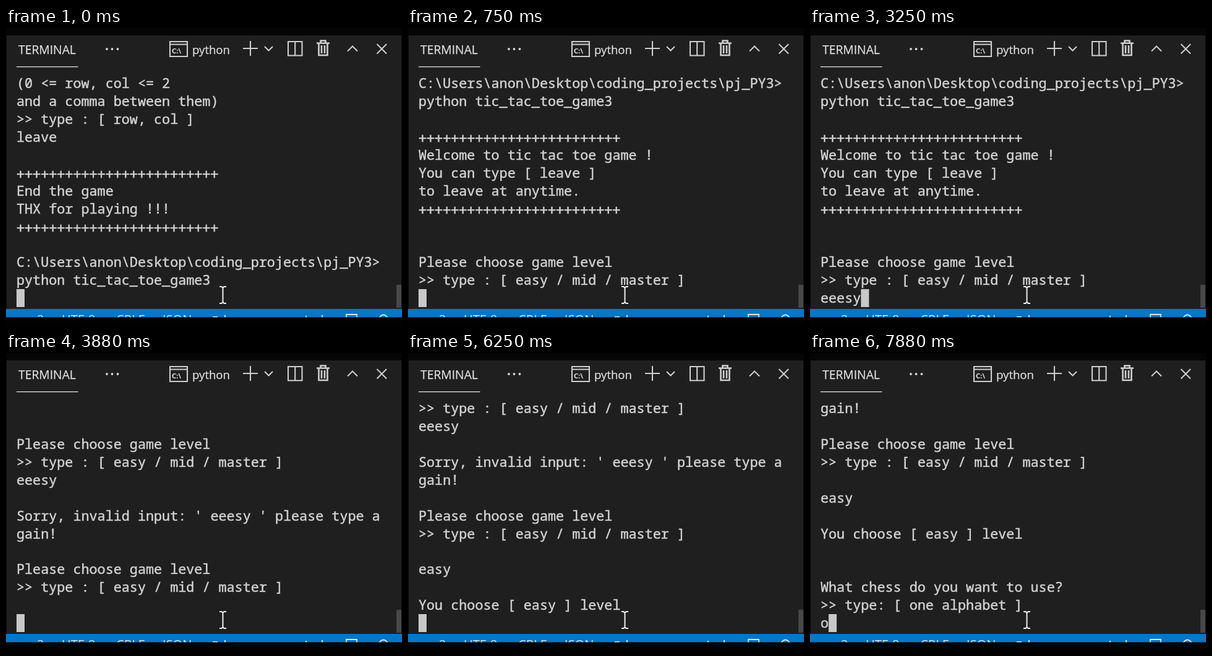
An HTML page for the animation above (8000 ms loop, 640 px wide and 480 px high).

```html
<!DOCTYPE html>
<html lang="en">
<head>
<meta charset="utf-8">
<title>Terminal session</title>
<style>
  html, body { margin: 0; width: 100%; height: 100%; overflow: hidden; background: #000; }
  svg { display: block; width: 100vw; height: 100vh; filter: blur(.55px); }
  .ui { font-family: "Open Sans", "Noto Sans", sans-serif; }
  .mono { font-family: "Noto Sans Mono", "DejaVu Sans Mono", monospace; font-size: 21.78px; fill: #d2d2d2; stroke: #d2d2d2; stroke-width: .5; }
  .mono text { white-space: pre; }
  .mono .rule { font-family: "DejaVu Sans Mono", monospace; font-size: 21.7px; transform: translateY(1.2px); }
  .icon { fill: none; stroke: #cecece; stroke-width: 2.1; }
</style>
</head>
<body>
<svg viewBox="0 0 640 480">
  <rect width="640" height="480" fill="#050505"/>
  <rect x="1" y="12" width="638" height="442" fill="#1f1f1f"/>

  <g class="ui" fill="#e0e0e0" stroke="#e0e0e0" stroke-width=".25">
    <text x="20" y="41.800" font-size="19.3">TERMINAL</text>
    <text x="301" y="41.800" font-size="18.6">python</text>
    <circle cx="163" cy="34" r="1.8"/>
    <circle cx="171.5" cy="34" r="1.8"/>
    <circle cx="180.5" cy="34" r="1.8"/>
    <rect x="17" y="62" width="99.5" height="1.3" stroke="none"/>
    <text x="268" y="41" font-size="11.5" font-weight="600">C:\</text>
  </g>

  <g class="icon">
    <path d="M265 22H293V46H265Z M265 26.5H293"/>
    <path d="M383 33H407 M395 21V45"/>
    <path d="M418 30L424.5 36.5L431 30"/>
    <path d="M456 22H478.5V44.5H456Z M467.2 22V44.5"/>
    <path d="M502 24.5H523 M508.5 24V20.5H516.5V24 M505.5 25V44H519.500V25 M510 28V41 M515 28V41" stroke-width="2.6"/>
    <path d="M552 37.5L560 29.5L568 37.5"/>
    <path d="M599.5 26L615 41.5 M615 26L599.5 41.5"/>
  </g>

  <g class="mono" id="rows"></g>
  <rect id="cursor" y="422" width="13" height="29" fill="#c8c8c8"/>
  <rect x="631" y="415" width="8" height="37" fill="#484848"/>
  <path d="M345 418H348.5L350.5 420L352.5 418H356 M350.5 420V443 M345 445H348.5L350.5 443L352.5 445H356"
        fill="none" stroke="#eee" stroke-width="2"/>

  <rect y="454" width="640" height="14" fill="#0676c6"/>
  <g class="ui" font-size="20.2" fill="#d5e6f2">
    <text x="50" y="478">2</text>
    <text x="90" y="478">UTF-8</text>
    <text x="178" y="478">CRLF</text>
    <text x="253" y="478">JSON</text>
    <path d="M334 466h8v2h-8z M353 464h2v4h-2z M484 465h2v3h-2z M510 464h2v4h-2z"/>
    <path d="M550 470V463H567V470 M602 470Q610 457 618 470" fill="none" stroke="#d5e6f2" stroke-width="1.8"/>
  </g>
  <rect y="467.5" width="640" height="12.5" fill="#020202"/>
</svg>
<script>
  const LOOP = 8000, ROWS = 13, LEFT = 17, CELL = 13.07, FIRST = 97.2, PITCH = 28.92;
  const rule = "+".repeat(25);
  const prompt = "Please choose game level\n>> type : [ easy / mid / master ]\n";

  // Each entry appends its text to the terminal at the given time (ms).
  const output = [
    [0, `(0 <= row, col <= 2
and a comma between them)
>> type : [ row, col ]
leave

${rule}
End the game
THX for playing !!!
${rule}

C:\\Users\\anon\\Desktop\\coding_projects\\pj_PY3>
python tic_tac_toe_game3
`],
    [750, `\n${rule}
Welcome to tic tac toe game !
You can type [ leave ]
to leave at anytime.
${rule}\n\n\n${prompt}`],
    [2130, "e"], [2250, "e"], [2500, "e"], [2880, "s"], [3250, "y"],
    [3880, `\n\nSorry, invalid input: ' eeesy ' please type a\ngain!\n\n${prompt}\n`],
    [4750, "e"], [5000, "a"], [5380, "s"], [5880, "y"],
    [6250, "\n\nYou choose [ easy ] level\n"],
    [6380, "\n\nWhat chess do you want to use?\n>> type: [ one alphabet ]\n"],
    [7880, "o"]
  ];

  const cursor = document.getElementById("cursor");
  const rows = Array.from({ length: ROWS }, (_, i) => {
    const row = document.createElementNS("http://www.w3.org/2000/svg", "text");
    row.setAttribute("x", LEFT);
    row.setAttribute("y", FIRST + i * PITCH);
    return document.getElementById("rows").appendChild(row);
  });

  let shown = "";
  function render(time) {
    const text = output.filter(([at]) => at <= time).map(([, part]) => part).join("");
    if (text === shown) return;
    shown = text;
    const lines = text.split("\n").slice(-ROWS);
    rows.forEach((row, i) => {
      row.textContent = lines[i];
      row.classList.toggle("rule", lines[i] === rule);
    });
    cursor.setAttribute("x", LEFT + lines[ROWS - 1].length * CELL);
  }

  const start = performance.now();
  function tick() {
    render((performance.now() - start) % LOOP);
    requestAnimationFrame(tick);
  }
  tick();
</script>
</body>
</html>
```
